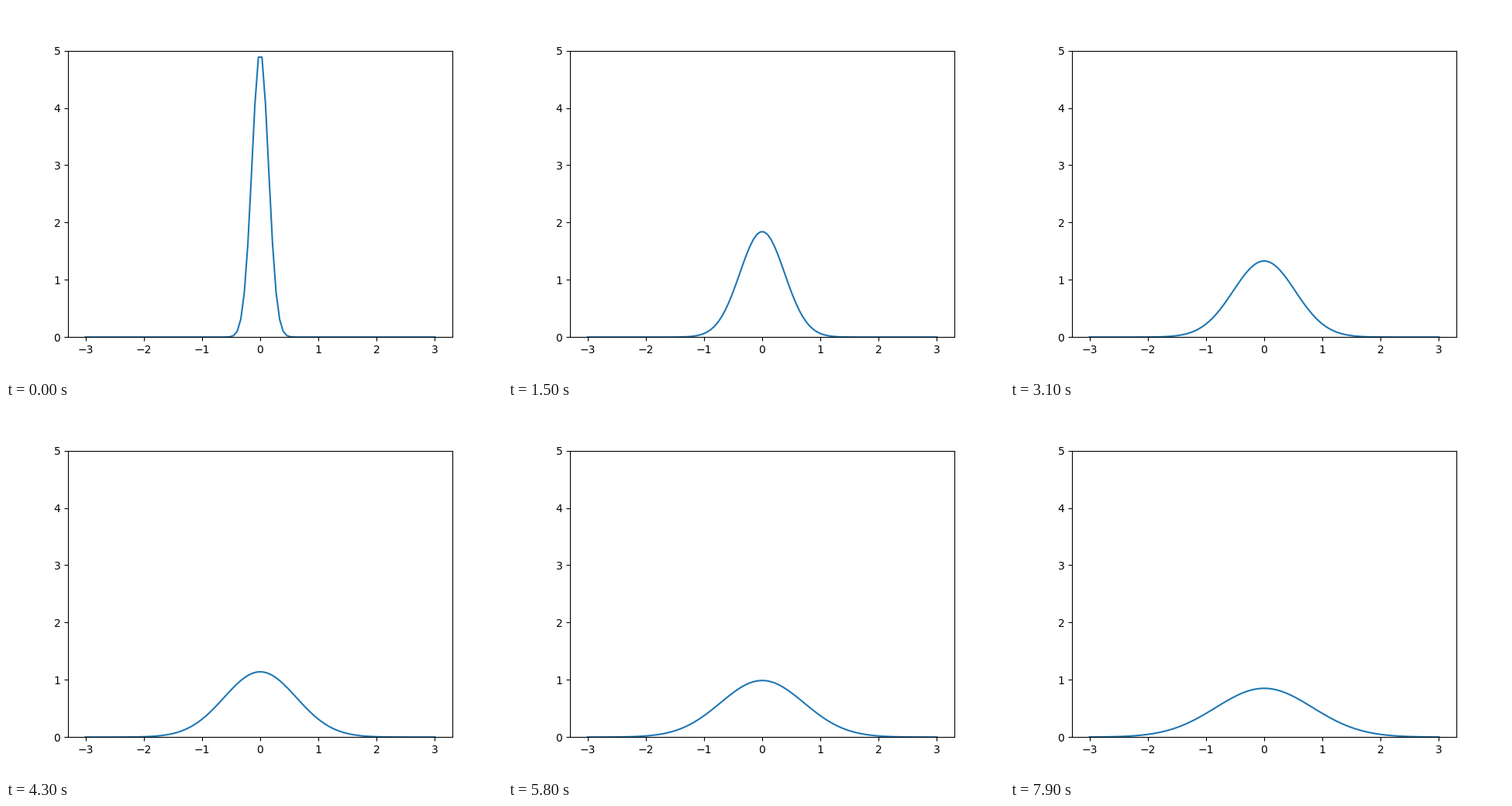
Animation of 640x480 px, one loop 8000 ms. Source, as a matplotlib script:

```python
import numpy as np
import matplotlib.pyplot as plt
from matplotlib.animation import FuncAnimation

FRAMES = 80
INTERVAL = 100  # ms
START = 0.04    # initial squared width, 4Dt
GROWTH = 0.01697  # widening per step

x = np.linspace(-3, 3, 100)


def heat_kernel(step):
    """Spreading Gaussian solution of the heat equation."""
    s = START + GROWTH * step
    return np.exp(-x**2 / s) / np.sqrt(s)


fig, ax = plt.subplots(figsize=(6.4, 4.8), dpi=100)
line, = ax.plot(x, heat_kernel(0))
ax.set_ylim(0, 5)


def update(step):
    line.set_ydata(heat_kernel(step))
    return line,


anim = FuncAnimation(fig, update, frames=FRAMES, interval=INTERVAL,
                     repeat=True, repeat_delay=0)
plt.show()
```
